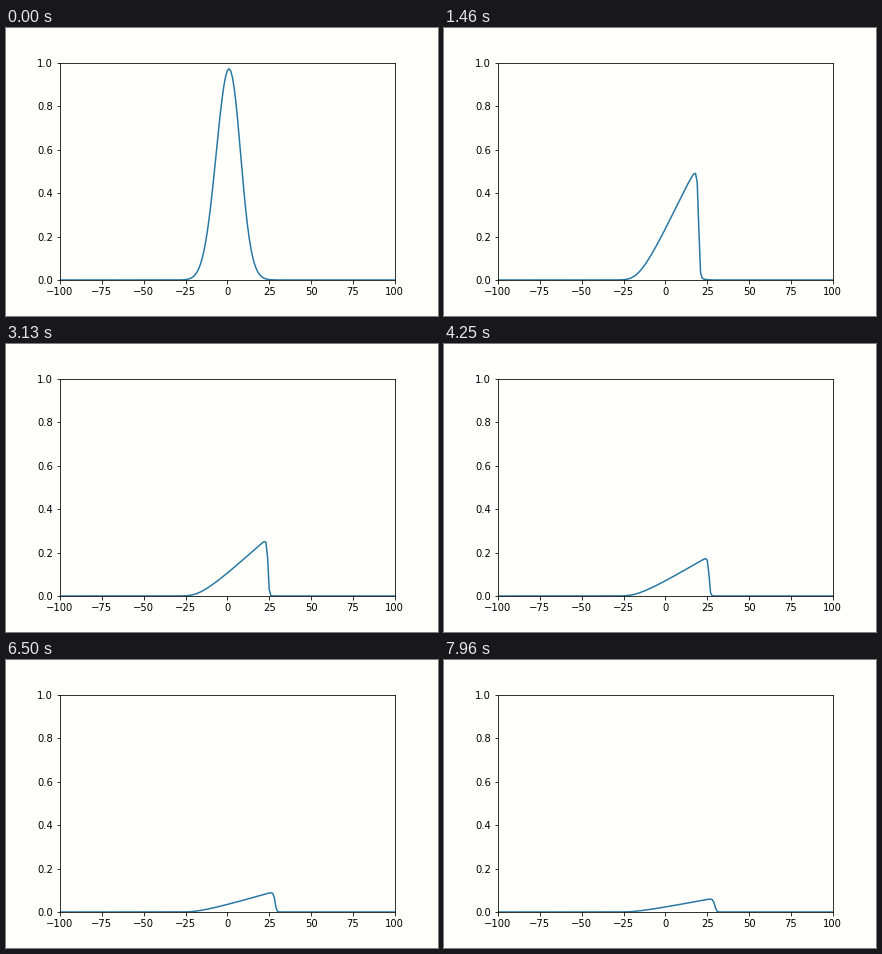
Animation, 432 px wide and 288 px high, one loop 8 s. Source, as a matplotlib script:

```python
import numpy as np
import matplotlib.pyplot as plt
from matplotlib.animation import FuncAnimation

FRAMES = 192
LOOP_MS = 8000
RATE = 1.05  # advection strength
DAMPING = 0.01
VISCOSITY = 0.01
BLEND = 0.03  # share of the upwind neighbour in the advection speed

PAPER = "#fffffc"
LINE = "#2777a2"


def advance(u):
    """One unit time step of the damped Burgers equation on a unit grid."""
    left = np.roll(u, 1)
    right = np.roll(u, -1)
    speed = RATE * ((1 - BLEND) * u + BLEND * left)
    rhs = u + VISCOSITY * (left - 2 * u + right)
    new = np.zeros_like(u)
    for i in range(1, len(u) - 1):
        new[i] = (rhs[i] + speed[i] * new[i - 1]) / (1 + speed[i] + DAMPING)
    return new


def solve(u, steps):
    history = []
    for _ in range(steps):
        u = advance(u)
        history.append(u)
    return history


x = np.arange(-100.0, 101.0)
waves = solve(np.exp(-x**2 / 100), FRAMES)

fig, ax = plt.subplots(figsize=(6, 4), dpi=72, facecolor=PAPER)
fig.subplots_adjust(left=0.125, right=0.9, bottom=0.125, top=0.88)
ax.set_facecolor(PAPER)
ax.set_xlim(-100, 100)
ax.set_ylim(0, 1)
(curve,) = ax.plot(x, waves[0], color=LINE, lw=1.5)


def draw(n):
    curve.set_ydata(waves[n])
    return (curve,)


anim = FuncAnimation(fig, draw, frames=FRAMES, interval=LOOP_MS / FRAMES,
                     repeat=True)
plt.show()
```
